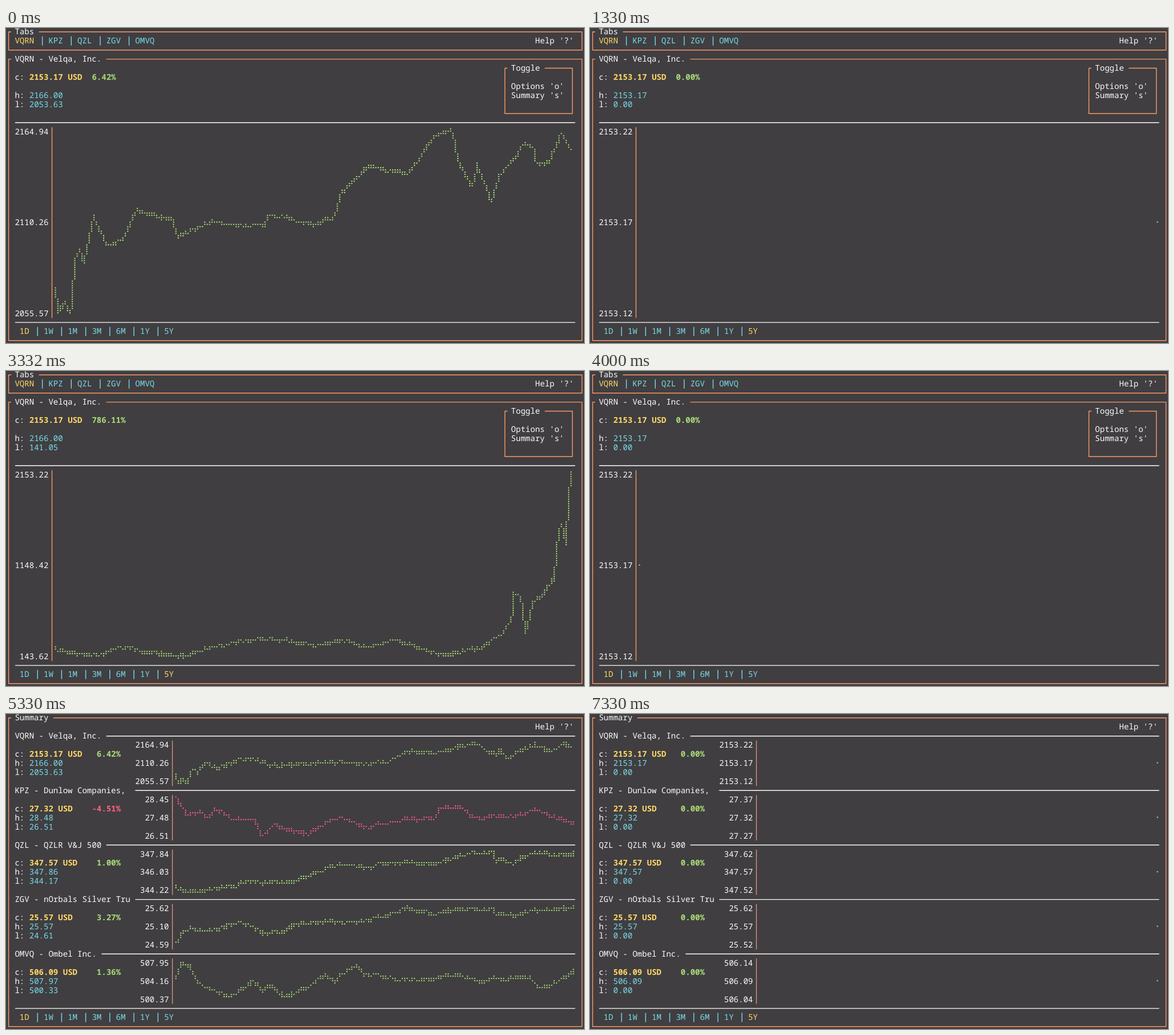
Recreate the animation shown at these times as an HTML page. Size 1012 px wide and 553 px high, loop 8 s.

```html
<!DOCTYPE html>
<html lang="en">
<head>
<meta charset="utf-8">
<title>Stock terminal</title>
<style>
  html, body { margin: 0; width: 100%; height: 100%; overflow: hidden; background: #403e41; }
  svg { display: block; width: 1012px; height: 553px; }
  text {
    font: 14.06px "Roboto Mono", "Noto Sans Mono", "DejaVu Sans Mono", monospace;
    white-space: pre;
    text-rendering: geometricPrecision;
  }
  .bold { font-weight: 700; }
  path { fill: none; stroke-width: 1.4; }
  .dots { stroke-width: 2.1; stroke-linecap: square; }
</style>
</head>
<body>
<svg id="stage" viewBox="0 0 1012 553"></svg>
<script>
const WHITE = '#fcfcfa', ORANGE = '#fc9867', YELLOW = '#ffd866',
      GREEN = '#a9dc76', CYAN = '#78dce8', RED = '#ff6188';
const CELL = 8.436, ROW = 15.94, LAST_COL = 119;
const textX = c => 15.4 + CELL * c;
const lineX = c => 4.6 + CELL * c;
const rowY = r => 6.8 + ROW * r;

// Turning points of each curve: percent across, percent down
const dayCurve = [
  [0, 87], [0.4, 99], [2, 93], [2.8, 100], [3.7, 70], [4.6, 64], [5.4, 72], [7.3, 47],
  [10, 64], [13, 60], [15.7, 44], [22.6, 48], [23.6, 57], [30.6, 50], [40.3, 52], [41, 46],
  [50.5, 51], [53.8, 48], [55.3, 34], [60, 20], [68.3, 24], [73, 4], [76.5, 0], [77.9, 18],
  [80.4, 32], [81.5, 19], [84.1, 40], [85.7, 24], [90.6, 8], [92.4, 11], [92.8, 20],
  [95.2, 18], [97.6, 2], [99.6, 10]];
const yearsCurve = [
  [0, 95.5], [9, 99], [12, 95], [25, 98.5], [36, 90], [42, 90], [52, 93], [56, 90], [61, 94],
  [65, 90], [74.5, 98], [82.3, 95], [86, 87], [88, 78], [88.5, 64], [89.3, 65], [90.1, 71],
  [90.7, 89], [92.1, 71], [94, 67], [96.2, 57], [96.8, 38], [97.6, 27], [98.5, 38], [99, 11], [99.6, 0]];
const homeCurve = [
  [0, 3], [2.7, 44], [6.3, 33], [8, 52], [10, 31], [14, 57], [20, 61], [21.2, 97], [25, 68],
  [33, 90], [38, 66], [41.7, 49], [48.6, 73], [58, 55], [65, 50], [66.1, 28], [73, 29],
  [73.7, 47], [85, 48], [91.6, 32], [94, 47], [100, 61]];
const fundCurve = [
  [0, 90], [2, 97], [15.4, 89], [16.5, 79], [28.6, 73], [33, 60], [42, 30], [49.5, 38],
  [51.5, 29], [68, 26], [74.5, 0], [79.8, 0], [80.2, 28], [81.8, 15], [84.8, 34], [87, 14],
  [91.8, 2], [95.7, 9], [100, 3]];
const metalCurve = [
  [0, 97], [1.7, 66], [3.3, 54], [10, 60], [16.2, 44], [22, 66], [26.8, 63], [29.7, 42],
  [42.3, 40], [52, 28], [57.8, 7], [66, 18], [74.3, 5], [79.8, 5], [80.2, 25], [82, 15],
  [85.4, 28], [86.5, 18], [100, 2]];
const fruitCurve = [
  [0, 50], [1.1, 7], [3.4, 13], [5.2, 48], [8, 66], [13.3, 94], [19.6, 55], [22, 76], [23, 58],
  [27.4, 86], [33.4, 64], [36.6, 39], [40.4, 53], [41.3, 34], [45.6, 11], [47.2, 30],
  [57.4, 50], [71, 37], [76.5, 47], [88.8, 42], [91.1, 66], [93.9, 62], [97, 46], [100, 25]];

const stocks = [
  { code: 'VQRN', name: 'Velqa, Inc.', now: 2153.17, pct: '6.42%', high: '2166.00', low: '2053.63',
    axis: ['2164.94', '2110.26', '2055.57'], curve: dayCurve },
  { code: 'KPZ', name: 'Dunlow Companies, ', now: 27.32, pct: '-4.51%', high: '28.48', low: '26.51',
    axis: ['28.45', '27.48', '26.51'], curve: homeCurve },
  { code: 'QZL', name: 'QZLR V&J 500', now: 347.57, pct: '1.00%', high: '347.86', low: '344.17',
    axis: ['347.84', '346.03', '344.22'], curve: fundCurve },
  { code: 'ZGV', name: 'nOrbals Silver Tru', now: 25.57, pct: '3.27%', high: '25.57', low: '24.61',
    axis: ['25.62', '25.10', '24.59'], curve: metalCurve },
  { code: 'OMVQ', name: 'Ombel Inc.', now: 506.09, pct: '1.36%', high: '507.97', low: '500.33',
    axis: ['507.95', '504.16', '500.37'], curve: fruitCurve }
];
const ranges = ['1D', '1W', '1M', '3M', '6M', '1Y', '5Y'];

// The same stock before its prices have loaded
const idle = s => ({
  ...s, pct: '0.00%', high: s.now.toFixed(2), low: '0.00', curve: null,
  axis: [0.05, 0, -0.05].map(d => (s.now + d).toFixed(2))
});

const stage = document.getElementById('stage');
let layer;

function add(tag, attrs) {
  const el = document.createElementNS('http://www.w3.org/2000/svg', tag);
  for (const key in attrs) el.setAttribute(key, attrs[key]);
  layer.append(el);
  return el;
}
function text(col, row, str, color = WHITE, bold = false) {
  add('text', { x: textX(col), y: rowY(row) + 4.6, fill: color, class: bold ? 'bold' : '' }).textContent = str;
}
const line = (d, color) => add('path', { d, stroke: color });
const rule = (row, from) => line(`M${from} ${rowY(row)}H996.5`, WHITE);
const bar = (col, top, bottom, color) =>
  line(`M${lineX(col)} ${rowY(top) - ROW / 2}V${rowY(bottom) + ROW / 2}`, color);

function frame(left, right, top, bottom, title) {
  const x = lineX(left), y = rowY(top), col = left + 0.05;
  text(Math.floor(col), top, title);
  line(`M${x + 4.5} ${y}H${x}V${rowY(bottom)}H${lineX(right)}V${y}H${textX(Math.floor(col) + title.length + 1)}`, ORANGE);
}

function tabs(names, col, row, active) {
  names.forEach((name, i) => {
    text(col, row, name, i === active ? YELLOW : CYAN);
    col += name.length + 3;
    if (i < names.length - 1) bar(col, row, row, CYAN);
  });
}

function hash(n) {
  const s = Math.sin(n * 127.1 + 3.7) * 43758.5;
  return s - Math.floor(s) - 0.5;
}
// Slow drift plus fine grain, in dots
function noise(x) {
  const i = Math.floor(x / 4), t = x / 4 - i;
  return 1.6 * (hash(i) * (1 - t) + hash(i + 1) * t) + 1.5 * hash(x + 0.3);
}

function valueAt(pts, x) {
  const i = Math.max(1, pts.findIndex(p => p[0] >= x));
  const [x0, y0] = pts[i - 1], [x1, y1] = pts[i];
  return y0 + (y1 - y0) * Math.max(0, (x - x0) / (x1 - x0));
}

// Braille-style chart: a grid of 2 by 4 dots per cell, right of an axis
function chart(col, row, height, stock, color, idleAt = 1) {
  const cols = 2 * (116 - col) + 2, rows = 4 * height - 1;
  let d = '', prev;
  const dot = (j, k) => {
    d += `M${(lineX(col) + 6.1 + j * CELL / 2).toFixed(1)} ${(rowY(row) - 4.8 + k * ROW / 4).toFixed(1)}h0`;
  };
  stock.axis.forEach((v, i) => text(col - 9, row + i * (height - 1) / 2, v.padStart(7)));
  bar(col, row, row + height - 1, col > 9 ? '#d4937f' : ORANGE);

  if (stock.curve) {
    const pts = stock.curve, end = pts[pts.length - 1][0];
    for (let j = 0; j / (cols - 1) * 100 <= end; j++) {
      const ks = [-0.25, 0.25].map(s => {
        const x = Math.min(end, Math.max(0, (j + s) / (cols - 1) * 100));
        const k = valueAt(pts, x) / 100 * (rows - 1) + noise(j + s);
        return Math.min(rows - 1, Math.max(0, Math.round(k)));
      });
      let lo = Math.min(...ks), hi = Math.max(...ks);
      if (prev) {
        lo = Math.min(lo, prev.hi + 1);
        hi = Math.max(hi, prev.lo - 1);
      }
      for (let k = lo; k <= hi; k++) dot(j, k);
      prev = { lo, hi };
    }
  } else {
    dot(idleAt * (cols - 1), (rows - 1) / 2);
  }
  add('path', { d, stroke: color, class: 'dots' });
}

function quote(row, gap, s) {
  text(0, row, 'c:');
  text(3, row, s.now.toFixed(2) + ' USD', YELLOW, true);
  [['h:', s.high], ['l:', s.low]].forEach(([label, value], i) => {
    text(0, row + gap + i, label);
    text(3, row + gap + i, value, CYAN);
  });
}

function footer(active) {
  rule(32, 16);
  tabs(ranges, 1, 33, active);
}

function detail(active, s, idleAt) {
  frame(0, LAST_COL, 0, 2, 'Tabs');
  tabs(stocks.map(q => q.code), 0, 1, 0);
  text(108, 1, "Help '?'");
  frame(0, LAST_COL, 3, 34, `${s.code} - ${s.name}`);
  quote(5, 2, s);
  text(16, 5, s.pct, GREEN, true);
  frame(103, 117, 4, 9, 'Toggle');
  text(103, 6, "Options 'o'");
  text(103, 7, "Summary 's'");
  rule(10, 16);
  chart(9, 11, 21, s, GREEN, idleAt);
  footer(active);
}

function summary(active, list) {
  frame(0, LAST_COL, 0, 34, 'Summary');
  text(108, 1, "Help '?'");
  list.forEach((s, i) => {
    const row = 2 + 6 * i, title = `${s.code} - ${s.name}`;
    const color = s.pct[0] === '-' ? RED : GREEN;
    text(0, row, title);
    rule(row, textX(title.length + 1));
    quote(row + 2, 1, s);
    text(22 - s.pct.length, row + 2, s.pct, color, true);
    chart(34, row + 1, 5, s, color);
  });
  footer(active);
}

const day = stocks[0];
const years = { ...day, pct: '786.11%', low: '141.05', axis: ['2153.22', '1148.42', '143.62'], curve: yearsCurve };

const LOOP = 8000;
const steps = [
  [0, () => detail(0, day)],
  [1330, () => detail(6, idle(day), 1)],
  [2330, () => detail(6, years)],
  [4000, () => detail(0, idle(day), 0)],
  [4330, () => detail(0, day)],
  [5330, () => summary(0, stocks)],
  [7330, () => summary(6, stocks.map(idle))]
].map(([at, draw]) => {
  layer = stage;
  layer = add('g', { visibility: 'hidden' });
  draw();
  return { at, el: layer };
});

const start = performance.now();
let shown;
function tick() {
  const t = (performance.now() - start) % LOOP;
  const next = steps.filter(s => s.at <= t).pop();
  if (next !== shown) {
    if (shown) shown.el.setAttribute('visibility', 'hidden');
    next.el.setAttribute('visibility', 'visible');
    shown = next;
  }
  requestAnimationFrame(tick);
}
tick();
</script>
</body>
</html>
```
